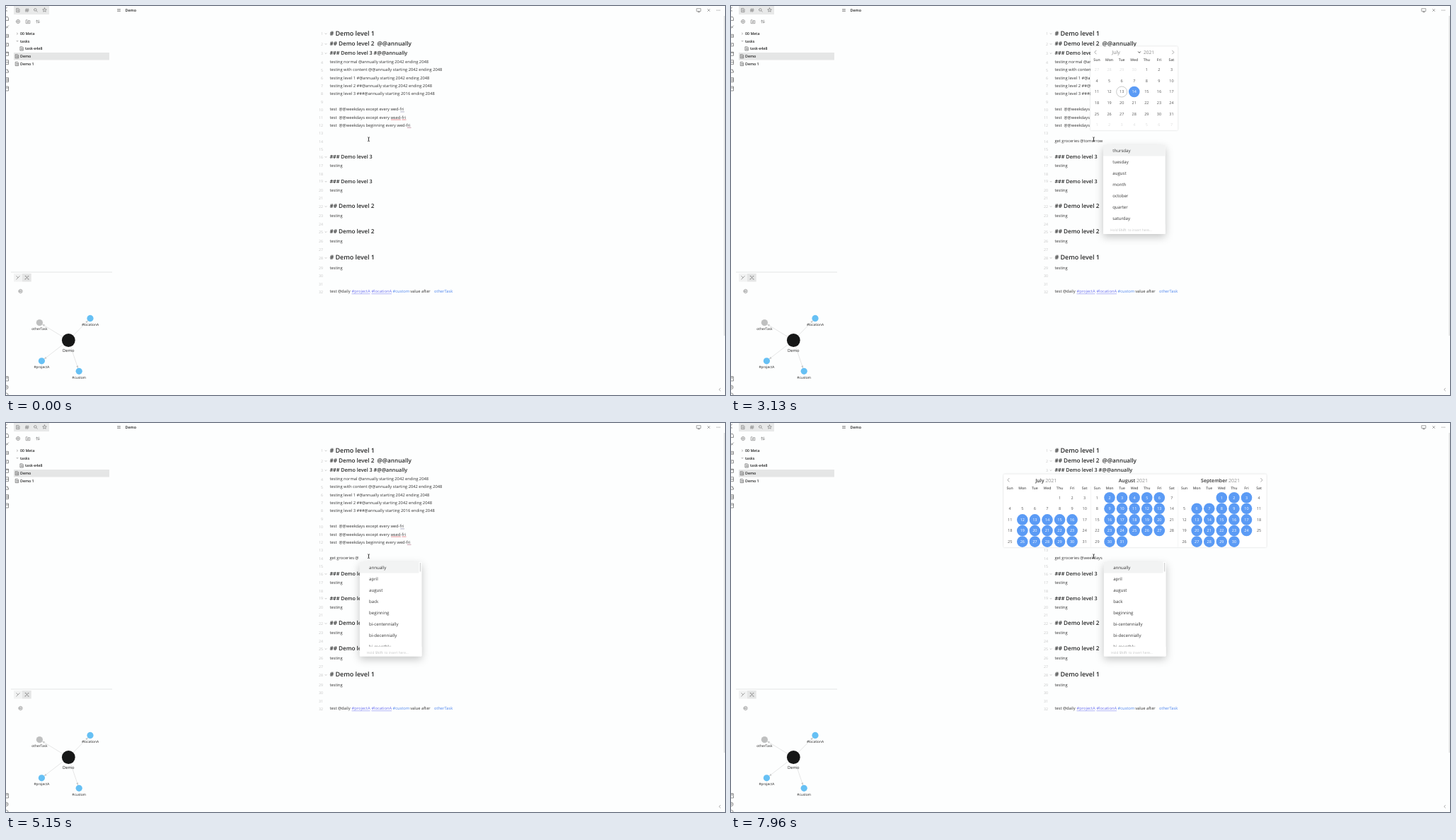
Write an HTML page that moves like this. It is 1016 by 551 pixels and loops after 8000 ms.

```html
<!DOCTYPE html>
<html lang="en">
<head>
<meta charset="utf-8">
<title>Task date suggestions</title>
<style>
  html, body { margin: 0; width: 100%; height: 100%; overflow: hidden; background: #fdfefe; }
  svg { display: block; width: 1016px; height: 551px; }
  text {
    font-family: "Open Sans", "Noto Sans", sans-serif;
    white-space: pre;
    text-rendering: geometricPrecision;
  }
  .icon { fill: none; stroke: #777; stroke-width: .65; stroke-linecap: round; stroke-linejoin: round; }
  .popup { fill: #fff; filter: drop-shadow(0 4px 6px rgba(0, 0, 0, .23)); }
  .calendar { fill: #fff; filter: drop-shadow(0 .5px 1.2px rgba(0, 0, 0, .16)); }
</style>
</head>
<body>
<svg id="stage" viewBox="0 0 1016 551">
  <g id="base"></g>
  <g id="live"></g>
  <path d="M511 185.8q1.5 0 1.5 .9v4q0 .9-1.5 .9M514 185.8q-1.5 0-1.5 .9v4q0 .9 1.5 .9" fill="none" stroke="#222" stroke-width=".7"/>
</svg>
<script>
const BODY = 5.76, INK = '#333', BLUE = '#5b9bf5', RED = '#e0525c';
const base = document.getElementById('base');
const live = document.getElementById('live');
let layer = base;

function add(tag, attrs) {
  const node = document.createElementNS('http://www.w3.org/2000/svg', tag);
  for (const key in attrs) node.setAttribute(key, attrs[key]);
  return layer.appendChild(node);
}

// y is the visual middle of the line
function label(x, y, string, size = BODY, fill = INK, more = {}) {
  const node = add('text', { x, y: y + size * .35, 'font-size': size, fill, ...more });
  node.textContent = string;
  return node;
}

const MIDDLE = { 'text-anchor': 'middle' };
const SEMI = { 'font-weight': 600 };
const rect = (x, y, width, height, fill, more) => add('rect', { x, y, width, height, fill, ...more });
const circle = (cx, cy, r, fill, more) => add('circle', { cx, cy, r, fill, ...more });
const icon = (x, y, d, more) => add('path', { d, transform: `translate(${x} ${y})`, class: 'icon', ...more });
const line = (x1, y1, x2, y2, stroke, width = .6) =>
  add('line', { x1, y1, x2, y2, stroke, 'stroke-width': width });

const FILE = 'M-2-2.6H1L2-1.6V2.6H-2ZM-1-.6H1M-1 .9H1';
const RING = 'M-2.6 0a2.6 2.6 0 1 0 5.2 0a2.6 2.6 0 1 0-5.2 0';
const CHEVRON_LEFT = 'M1-2.4L-1.2 0L1 2.4', CHEVRON_RIGHT = 'M-1-2.4L1.2 0L-1 2.4';

function drawSidebar() {
  const ribbon = ['M-1-1.5L1-3M-1 1.5L1 2', 'M-1-2H2L3 0V3H-1', 'M-1 2L3-2M0-1L2 1', 'M-1-2H3V2H-1M-1 0H2',
    'M-1-2H3V2H-1M-1 1L1-1', 'M-1-2H3V3H-1M-1-1H3', 'M-1-3H3V3H-1M-1 0H3', 'M-1-2H2V0H3V2H-1',
    'M-1-3H3V3H-1M0-1H3M0 1H3', 'M-1-3H3V3H-1M-1-1H3'];
  const dark = { style: 'stroke:#555' };
  ribbon.forEach((d, i) => icon(.5, 5 + i * 12.45, d, dark));
  icon(.5, 528, 'M-1-3H3V3H-1M1-3V0', dark);
  icon(.5, 540, RING + 'M0-1Q2-1 0 1', dark);
  icon(.5, 551, RING, dark);

  rect(11, 0, 50, 12, '#e8e9e9');
  icon(17, 6, FILE);
  icon(29.7, 6, 'M-.8-2.4L-1.4 2.4M1.4-2.4L.8 2.4M-2.3-.9H2.5M-2.5 .9H2.3');
  icon(41.5, 5.3, 'M-2 0a1.8 1.8 0 1 0 3.6 0a1.8 1.8 0 1 0-3.6 0M1.2 1.3L2.8 2.8');
  icon(54.5, 5.6, 'M0-2.8L.8-.9L2.8-.7L1.3 .6L1.7 2.6L0 1.5L-1.7 2.6L-1.3 .6L-2.8-.7L-.8-.9Z');
  icon(17, 22, RING + 'M-1.2 0H1.2M0-1.2V1.2');
  icon(31, 22, 'M-2.8 2.3V-2.2H-.8L0-1.3H2.8V2.3ZM-1 .6H1M0-.4V1.6');
  icon(45, 22, 'M-1.3 2V-2L-2.5-.8M-1.3-2L-.2-.8M1.3-2V2L.2 .8M1.3 2L2.5 .8');

  rect(11, 66, 135, 10.5, '#e5e6e6');
  icon(16, 39.2, 'M-.5-1L.6 0L-.5 1');
  icon(16, 49.7, 'M-1-.5L0 .6L1-.5');
  [[22.3, 60.4], [15.6, 71.3], [15.6, 82]].forEach(([x, y]) => icon(x, y, FILE, dark));
  [[20, 39.2, '00 Meta'], [20, 49.7, 'tasks'], [27, 60.4, 'task-e4e8'], [20, 71.2, 'Demo'], [20, 82, 'Demo 1']]
    .forEach(([x, y, name]) => label(x, y, name, 5.3, '#222', SEMI));

  line(7, 377, 150, 377, '#dcdddd', .8);
  rect(11, 379, 12, 11.5, '#f2f3f3');
  rect(23, 379, 12.7, 11.5, '#e5e6e6');
  icon(17, 384.7, 'M-2.3-2.2L0 .2L2.3-2.2M0 .2L-2.3 2.4');
  icon(29.5, 384.7, 'M-2.2 2.2L0 0L2.2 2.3M0 0L-1.8-2.2M0 0L2-1.8M-2.4-2.2H-1.4M1.5-2H2.5M-2.6 2.2H-1.6M1.6 2.3H2.6');
  icon(20.5, 404, RING + 'M-1 0a1 1 0 1 0 2 0a1 1 0 1 0-2 0');
}

function drawGraph() {
  const hub = [88.3, 473.5], sky = '#66c0f4';
  const nodes = [
    [47.4, 448.5, 'otherTask', '#bfc0c0'], [119, 442.4, '#locationA', sky],
    [50.4, 502.8, '#projectA', sky], [103.2, 517.3, '#custom', sky]];
  for (const [x, y, name, fill] of nodes) {
    line(...hub, x, y, '#d5d6d6');
    const angle = Math.atan2(y - hub[1], x - hub[0]) * 180 / Math.PI;
    add('path', { d: 'M-4.5 0L-8-1.6V1.6Z', fill: '#c8c9c9', transform: `translate(${x} ${y}) rotate(${angle})` });
    circle(x, y, 4.6, fill);
    label(x, y + 8.9, name, 4.85, '#222', MIDDLE);
  }
  circle(...hub, 9.4, '#161717');
  label(hub[0], 488, 'Demo', 5.8, '#222', MIDDLE);
}

function drawHeader() {
  icon(159.5, 6, 'M-2-1.5H2M-2 0H2M-2 1.5H2', { 'stroke-dasharray': '1 .5' });
  label(168.5, 6, 'Demo', 5.4, '#222', SEMI);
  icon(979, 6, 'M-2.8-2.3H2.8V1.4H-2.8ZM-1.3 2.7H1.3M0 1.4V2.7');
  icon(993, 6, 'M-1.5-1.5L1.5 1.5M1.5-1.5L-1.5 1.5');
  [-2, 0, 2].forEach(dx => circle(1006.7 + dx, 6, .5, '#666'));
  icon(1008.6, 543.3, 'M.8-1.7L-.9 0L.8 1.7', { 'stroke-width': .9 });
  rect(1014.3, 14, 1.7, 453, '#e3e4e4');
}

function drawEditor() {
  const lines = [
    '# Demo level 1', '## Demo level 2  @@annually', '### Demo level 3 #@@annually',
    'testing normal @annually starting 2042 ending 2048',
    'testing with content @@annually starting 2042 ending 2048',
    'testing level 1 #@annually starting 2042 ending 2048',
    'testing level 2 ##@annually starting 2042 ending 2048',
    'testing level 3 ###@annually starting 2016 ending 2048', '',
    'test  @@weekdays except every wed-fri', 'test  @@weekdays except every wsed-fri',
    'test  @@weekdays beginning every wed-fri', '', '', '',
    '### Demo level 3', 'testing', '', '### Demo level 3', 'testing', '',
    '## Demo level 2', 'testing', '', '## Demo level 2', 'testing', '',
    '# Demo level 1', 'testing', '', '', ''];
  // by heading level: text size, shift before the line, step after it
  const size = [BODY, 8.95, 8.15, 7.2];
  const above = [0, .8, .1, -.4], below = [11.2, 14.5, 13.6, 12.8];
  let y = 37.8;
  lines.forEach((string, i) => {
    const level = string.match(/^#*/)[0].length;
    y += above[level];
    label(448, y + .6, i + 1, 5.2, '#c3c4c4', { 'text-anchor': 'end' });
    label(457.4, y, string, size[level], level ? '#252626' : INK, level ? SEMI : {});
    if (level) icon(452, y + .8, 'M-1-.5L0 .5L1-.5', { style: 'stroke:#aaa' });
    y += below[level];
  });

  line(557.3, 149.9, 563, 149.9, '#77789c');
  line(544, 161.1, 558, 161.1, RED);
  line(559.5, 161.1, 565.5, 161.1, RED);
  line(566.8, 172.3, 572.5, 172.3, '#a8607a');

  const violet = '#6a70f0', sky = '#4f86ee', last = 404.4;
  [[457.4, 'test @daily', INK], [488.5, '#projectA', violet], [516.4, '#locationA', violet],
    [546.5, '#custom', sky], [571.2, 'value after', INK], [605, 'otherTask', sky]]
    .forEach(([x, string, fill]) => label(x, last, string, BODY, fill));
  line(488.5, last + 3.3, 514.5, last + 3.3, violet, .5);
  line(516.4, last + 3.3, 545, last + 3.3, violet, .5);
}

const LISTS = {
  all: 'annually april august back beginning bi-centennially bi-decennially bi-monthly',
  to: 'thursday tuesday august month october quarter saturday',
  th: 'thursday thursdays this today tomorrow tuesday tuesdays',
  n: 'next november annually beginning ending june monday',
  we: 'wednesday wednesdays week weekday weekdays weekend weekly',
  weekdays: 'weekdays'
};

function drawPopup(x, key) {
  const top = 196.9, width = 87.7;
  const items = LISTS[key].split(' ');
  const listHeight = Math.min(items.length * 16, 119.5);
  rect(x, top, width, listHeight + 14, '#fff', { class: 'popup', rx: 1 });
  rect(x, top, width - (key === 'all' ? 4 : 0), 15.6, '#f2f3f3');
  items.forEach((item, i) => label(x + 13.3, 204.8 + i * 16, item, 6.1));
  rect(x, top + listHeight, width, 14, '#fff', { rx: 1 });
  if (key === 'all') rect(x + 85, 198, 1.4, 12.5, '#d3d4d4');
  const foot = label(x + 10, top + listHeight + 8.6, 'Hold ', 4.8, '#c6c7c7');
  const shift = document.createElementNS(foot.namespaceURI, 'tspan');
  shift.setAttribute('font-weight', 600);
  shift.textContent = 'Shift';
  foot.append(shift, '  to insert here...');
}

const WEEK = ['Sun', 'Mon', 'Tue', 'Wed', 'Thu', 'Fri', 'Sat'];
const STEP_X = 17.58, STEP_Y = 15.65;

function drawWeekNames(x, y) {
  WEEK.forEach((name, i) => label(x + i * STEP_X, y, name, 5.1, '#555', { ...MIDDLE, ...SEMI }));
}

function drawDay(x, y, day, fill, picked) {
  if (picked) circle(x, y, 7.8, BLUE);
  label(x, y, day, 5.5, picked ? '#fff' : fill, MIDDLE);
}

function drawMonth(left, picked) {
  rect(left, 57.3, 123.3, 118.7, '#fff', { class: 'calendar', rx: 1.5 });
  icon(left + 7, 65.5, CHEVRON_LEFT);
  icon(left + 116.6, 65.5, CHEVRON_RIGHT);
  label(left + 30.3, 66, 'July', 7, '#858686');
  icon(left + 69, 65.6, 'M-1.5-.8L0 .8L1.5-.8', { style: 'stroke:#333;stroke-width:.9' });
  label(left + 75, 66, '2021', 6.6, '#858686');
  drawWeekNames(left + 9, 76.5);
  for (let cell = 0; cell < 42; cell++) {
    const date = new Date(2021, 5, 27 + cell), day = date.getDate();
    const inside = date.getMonth() === 6;
    const x = left + 9 + cell % 7 * STEP_X, y = 90.2 + Math.floor(cell / 7) * STEP_Y;
    if (inside && day === 13) circle(x, y, 7.5, 'none', { stroke: '#a5a6a6', 'stroke-width': .6 });
    drawDay(x, y, day, inside ? '#555' : '#dcdddd', inside && day === picked);
  }
}

function drawQuarter() {
  rect(385.2, 72.5, 371.5, 103.5, '#fff', { class: 'calendar', rx: 1.5 });
  icon(392, 80.8, CHEVRON_LEFT);
  icon(749.7, 80.8, CHEVRON_RIGHT);
  ['July', 'August', 'September'].forEach((name, i) => {
    const left = 394.2 + i * 123.2, month = 6 + i;
    if (i) line(left - 8.9, 90, left - 8.9, 176, '#e9eaea', .5);
    const title = label(left + 51, 81.2, name, 7, '#333', { ...MIDDLE, ...SEMI });
    const year = document.createElementNS(title.namespaceURI, 'tspan');
    year.setAttribute('fill', '#8f9090');
    year.setAttribute('font-weight', 400);
    year.textContent = ' 2021';
    title.append(year);
    drawWeekNames(left, 92);
    const offset = new Date(2021, month, 1).getDay();
    const days = new Date(2021, month + 1, 0).getDate();
    for (let day = 1; day <= days; day++) {
      const cell = offset + day - 1, column = cell % 7;
      const picked = column > 0 && column < 6 && (i > 0 || day >= 12);
      drawDay(left + column * STEP_X, 105.7 + Math.floor(cell / 7) * 15.6, day, '#555', picked);
    }
  });
}

// [start ms, typed text, caret x, list, calendar, caret shown]
const TASK = 'get groceries ', ON = true, OFF = false;
const STATES = [
  [0, '', 457.5, '', 0, OFF],
  [50, 'g', 461, '', 0, ON],
  [200, 'get', 466, '', 0, ON],
  [340, 'get ', 467.5, '', 0, ON],
  [490, 'get gr', 473, '', 0, ON],
  [640, 'get gro', 476.5, '', 0, ON],
  [780, 'get groce', 482.5, '', 0, ON],
  [930, 'get grocer', 485, '', 0, ON],
  [1080, 'get groceries', 492.2, '', 0, ON],
  [1220, TASK, 493.6, '', 0, ON],
  [1510, TASK + '@', 499.8, 'all', 0, ON],
  [1660, TASK + '@t', 501.7, 'to', 0, ON],
  [1810, TASK + '@tom', 510.3, 'to', 0, ON],
  [2100, TASK + '@tomor', 516.3, 'to', 0, ON],
  [2250, TASK + '@tomorrow', 526, 'to', 0, ON],
  [2540, TASK + '@tomorrow', 526, 'to', 14, ON],
  [2690, TASK + '@tomorrow', 526, 'to', 14, OFF],
  [2840, TASK + '@tomorrow', 526, 'to', 14, ON],
  [3130, TASK + '@tomorrow', 526, 'to', 14, OFF],
  [3420, TASK + '@', 499.8, 'all', 0, ON],
  [3710, TASK + '@n', 503.2, 'n', 0, ON],
  [3850, TASK + '@nex', 509.4, 'n', 0, ON],
  [3990, TASK + '@next ', 512.5, 'all', 0, ON],
  [4130, TASK + '@next t', 514.5, 'th', 0, ON],
  [4270, TASK + '@next thu', 521.4, 'th', 0, ON],
  [4560, TASK + '@next thu', 521.4, 'th', 22, OFF],
  [4860, TASK + '@next ', 512.5, 'all', 0, ON],
  [5000, TASK + '@', 499.8, 'all', 0, ON],
  [5150, TASK + '@', 499.8, 'all', 0, OFF],
  [5580, TASK + '@t', 501.7, 'th', 0, ON],
  [5730, TASK + '@tod', 508.6, 'to', 0, ON],
  [5880, TASK + '@today', 514.6, 'to', 0, ON],
  [6170, TASK + '@', 499.8, 'all', 13, ON],
  [6320, TASK + '@', 499.8, 'all', 13, OFF],
  [6470, TASK + '@', 499.8, 'all', 0, ON],
  [6620, TASK + '@w', 504, 'we', 0, ON],
  [6770, TASK + '@wee', 510.5, 'we', 0, ON],
  [6920, TASK + '@week', 513.4, 'we', 0, ON],
  [7080, TASK + '@weekda', 519.8, 'we', 0, ON],
  [7230, TASK + '@weekdays', 525.2, 'weekdays', 0, ON],
  [7520, TASK + '@weekdays ', 526.9, 'all', 0, ON],
  [7670, TASK + '@weekdays ', 526.9, 'all', 'quarter', ON],
  [7960, TASK + '@weekdays ', 526.9, 'all', 'quarter', OFF]
];

function drawState([, typed, x, list, calendar, caret]) {
  live.replaceChildren();
  label(457.4, 191.1, typed);
  if (calendar === 22) line(512.3, 194.6, 521, 194.6, RED);
  if (list) drawPopup(x, list);
  if (calendar === 'quarter') drawQuarter();
  else if (calendar) drawMonth(x - 18, calendar);
  if (caret) line(x, 185.8, x, 196.2, '#222', .7);
}

drawSidebar();
drawGraph();
drawHeader();
drawEditor();
layer = live;

const start = performance.now();
let shown = null;
function tick() {
  const time = (performance.now() - start) % 8000;
  const state = STATES.findLast(entry => entry[0] <= time);
  if (state !== shown) drawState(shown = state);
  requestAnimationFrame(tick);
}
tick();
</script>
</body>
</html>
```
